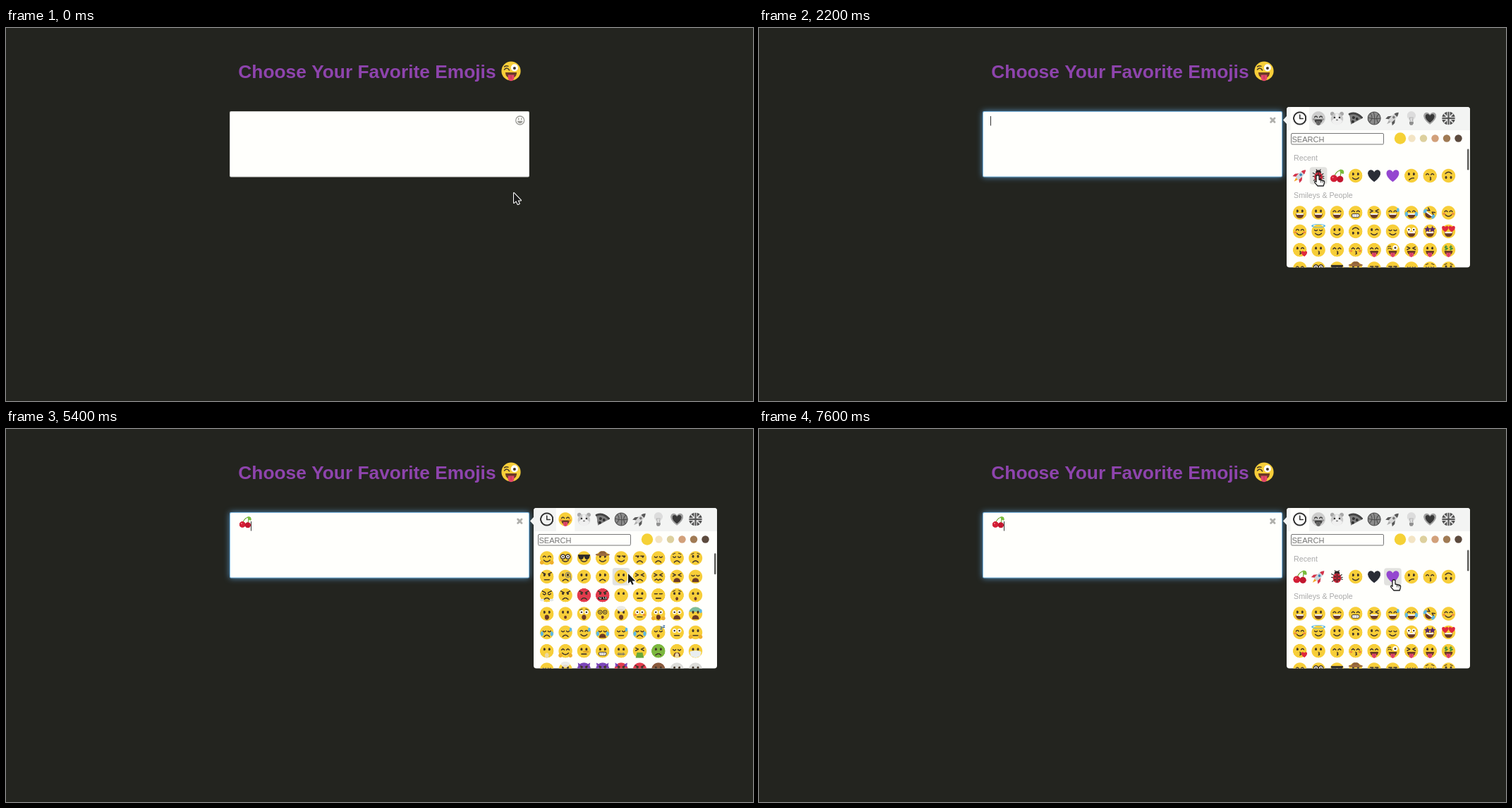
Write an HTML page with a canvas that moves like this. It is 1059 px wide and 529 px high and loops after 8 s.

```html
<!DOCTYPE html>
<html lang="en">
<head>
<meta charset="utf-8">
<title>Emoji picker</title>
<style>
html, body { margin: 0; width: 100%; height: 100%; overflow: hidden; background: #23241f; }
canvas { display: block; }
</style>
</head>
<body>
<canvas width="1059" height="529"></canvas>
<script>
let ctx = document.querySelector('canvas').getContext('2d');
const FONT = '"Liberation Sans", Arial, sans-serif';
const BG = '#23241f', PAPER = '#fffffc', INK = '#43362a', MOUTH = '#6b3a26', RED = '#e0283c', BLUE = '#5cb8e4';
const TINT = { R: '#e23b4d', G: '#7cb83e', P: '#7b45b8', U: '#8a5a3c', L: '#dcdcd8' };
const HEART = 'M0 9C-14-1-9-9-4.5-8.5Q-1-8 0-5Q1-8 4.5-8.5C9-9 14-1 0 9z';
const PITCH = 26.35, HALF = 12.35, SPRITE = 30;

// Drawing helpers
function disc(x, y, rx, color, ry = rx) {
  ctx.beginPath();
  ctx.ellipse(x, y, rx, ry, 0, 0, 7);
  ctx.fillStyle = color;
  ctx.fill();
}
function fill(path, color) {
  ctx.fillStyle = color;
  ctx.fill(new Path2D(path));
}
function line(path, color = INK, width = 1.5) {
  ctx.strokeStyle = color;
  ctx.lineWidth = width;
  ctx.lineCap = ctx.lineJoin = 'round';
  ctx.stroke(new Path2D(path));
}
function box(x, y, w, h, r, color, border) {
  ctx.beginPath();
  ctx.roundRect(x, y, w, h, r);
  ctx.fillStyle = color;
  ctx.fill();
  if (border) { ctx.strokeStyle = border; ctx.lineWidth = 1; ctx.stroke(); }
}
function text(str, x, y, size, color, weight = '') {
  ctx.font = `${weight} ${size}px ${FONT}`;
  ctx.fillStyle = color;
  ctx.fillText(str, x, y);
}
function at(x, y, scale, draw) {
  ctx.save();
  ctx.translate(x, y);
  ctx.scale(scale, scale);
  draw();
  ctx.restore();
}
const ring = (x, y, r) => `M${x - r} ${y}a${r} ${r} 0 1 0 ${2 * r} 0a${r} ${r} 0 1 0 ${-2 * r} 0`;
const both = draw => [-3.6, 3.6].forEach(x => draw(x));

// A face code is one eye letter, one mouth letter, then any extras
const eyes = {
  o: () => both(x => disc(x, -2.5, 1.5, INK, 2)),
  '^': () => both(x => line(`M${x - 2}-1.5q2-3 4 0`)),
  u: () => both(x => line(`M${x - 2}-2q2 2.4 4 0`)),
  '-': () => both(x => line(`M${x - 2}-2h4`)),
  _: () => both(x => { line(`M${x - 2.2}-3h4.4`); disc(x + .8, -1.8, 1.3, INK); }),
  x: () => line('M-6-4.5l4 2-4 2M6-4.5l-4 2 4 2'),
  w: () => { disc(-3.6, -2.5, 1.5, INK, 2); line('M2-2q2-2.5 4 0'); },
  W: () => both(x => { disc(x, -2.5, 3, '#fff'); disc(x, -2.5, 1.3, INK); }),
  Z: () => {
    line('M-7-1.5q3-3 5.2 .6M-7-4.5q2-1.5 4-.5', INK, 1.1);
    disc(3.6, -3.4, 3.7, '#fff');
    disc(3.6, -3, 1.5, INK);
  },
  '*': () => both(x => fill(`M${x}-8l1.4 3.2 3.4.3-2.5 2.3.7 3.4-3-1.8-3 1.8.7-3.4-2.5-2.3 3.4-.3z`, '#5b2a6b')),
  h: () => both(x => at(x * 1.35, -3.5, .52, () => fill(HEART, RED))),
  $: () => both(x => line(`M${x + 1.6}-4.5q-3-1.5-3.2.5t3 1.8t-3 2.2M${x}-6.2v6.6`, '#3d8b3a', 1.2)),
  G: () => both(x => { disc(x, -2, 3.3, '#fff'); line(ring(x, -2, 3.3)); disc(x, -2, 1.2, INK); }),
  S: () => fill('M-9-5h18l-1 4q-1 3-4 3t-3.5-4h-1q0 4-3.5 4t-4-3z', '#2c2a2a'),
  M: () => { eyes.o(); line(ring(3.6, -2.5, 3.6) + 'M7-1l1.5 6', '#777', 1); },
  '@': () => both(x => { line(ring(x, -2.5, 2.8), INK, 1); disc(x, -2.5, 1, INK); })
};
const mouths = {
  '.': () => {},
  D: () => { fill('M-6 1h12q-.5 7-6 7t-6-7z', MOUTH); fill('M-5.5 1h11l-.6 2h-9.8z', '#fff'); },
  g: () => { box(-5.5, 1.5, 11, 5, 2.2, '#fff', INK); line('M-5 4h10M-2 2v4M2 2v4', '#999', .5); },
  ')': () => line('M-4.5 3q4.5 4.5 9 0'),
  '(': () => line('M-4 6.2q4-4.4 8 0'),
  '-': () => line('M-3.5 4.5h7'),
  '/': () => line('M-3 6q3-3 6.5-2.5'),
  o: () => disc(0, 5, 1.9, MOUTH, 2.3),
  O: () => disc(0, 5, 3.2, MOUTH, 3.7),
  k: () => line('M0 2q3 1 .2 2.2q3 1-.2 2.2', INK, 1.2),
  t: () => {
    fill('M-6 1.5h12q-.5 6-6 6t-6-6z', MOUTH);
    fill('M-3.2 4h6.4v3.4q-.4 3-3.2 3t-3.2-3z', '#e2476a');
    line('M0 5v3', '#b92f52', .7);
  },
  T: () => fill('M-5 8q0-6 5-6t5 6z', MOUTH),
  w: () => line('M-5 5l2.5-1.5 2.5 2 2.5-2 2.5 1.5'),
  '#': () => { box(-6.5, 2, 13, 4.5, 1.5, '#2c2424'); line('M-5 3l1.5 2.4M-2 3v2.4M1 3l1.5 2.4M5 3v2.4', '#fff', .8); },
  z: () => line('M-5.5 4.5h11M-4 3v3M-1.5 3v3M1 3v3M3.5 3v3', '#6d6d6d', 1),
  V: () => fill('M-4 2h8l2 8h-12z', '#69a83a'),
  K: () => fill('M-8.5 1q8.5-3 17 0l-1.5 6q-7 5-14 0z', '#e9eef0')
};
const extras = {
  b: () => both(x => disc(x * 1.8, 1.5, 2, '#f0883e', 1.4)),
  d: () => disc(7.6, -4, 1.9, BLUE, 3),
  t: () => both(x => disc(x * 2, 2, 2.2, BLUE, 3.4)),
  h: () => at(0, -8, 1, () => { ctx.scale(1, .27); line(ring(0, 0, 9), BLUE, 2.6); }),
  H: () => at(6.5, 5.5, .45, () => fill(HEART, RED)),
  n: () => both(x => disc(x * 2, 6.5, 3, '#efb02c')),
  a: () => line('M-6-5.5l3.5-1.6M6-5.5l-3.5-1.6', INK, 1),
  v: () => line('M-6.5-6l4.5 2.2M6.5-6l-4.5 2.2'),
  c: () => { fill('M-6-5q1-6 6-5q5-1 6 5z', '#8e6038'); disc(0, -5, 10.5, '#9c6c40', 2); },
  s: () => both(x => disc(x * 1.9, 7, 3, '#e3e8ea', 2)),
  e: () => { disc(0, -8, 6.5, '#ecebe6', 3.6); disc(0, -5, 4, '#e7dcc8', 2); },
  B: () => fill('M-9.5-3a10 10 0 0 1 19 0z', '#7dbd9c'),
  Z: () => line('M3-8h3l-3 3.4h3M7-10h2.4l-2.4 2.8h2.4', '#3a6ea8', 1),
  N: () => line('M0 1h6', '#e0a52a', 2.6),
  p: () => disc(0, 6.5, 3, '#ecd9a4', 3.8),
  j: () => fill('M-9-10l1 7 4-4zM9-10l-1 7-4-4z', TINT.P)
};
function face(code) {
  const [eye, mouth, ...more] = code;
  if (more.includes('f')) ctx.rotate(Math.PI);
  if (more.includes('l')) ctx.rotate(.6);
  const tint = more.find(c => TINT[c]);
  disc(0, 0, 10, tint ? TINT[tint] : '#f7ce39');
  if (more.includes('B')) extras.B();
  eyes[eye]();
  mouths[mouth]();
  more.forEach(c => c !== 'B' && extras[c] && extras[c]());
}

const icons = {
  cherry() {
    line('M-4 2Q-2-6 5-8Q6-2 4.5 1', '#6da52f', 1.2);
    fill('M4-9q7-1 6 6q-6 1-6-6z', '#79bd3c');
    disc(-4.5, 4, 5.2, '#d31f36');
    disc(4.5, 5, 4.8, '#c2172f');
    disc(-6, 2.5, 1.2, '#ee6c79');
  },
  rocket() {
    ctx.rotate(Math.PI / 4);
    fill('M-2 6h4l-2 6z', '#f5a623');
    fill('M-3-2l-4 5v5l4-3zM3-2l4 5v5l-4-3z', '#d4334a');
    fill('M0-12q5 6 3 18h-6q-2-12 3-18z', '#cfd6dc');
    fill('M0-12q2.6 3 3 6h-6q.4-3 3-6z', '#d4334a');
    disc(0, -2, 1.8, '#3b82b5');
  },
  beetle() {
    line('M-8-4l16 8M-8 1h16M-7 7l14-10M-3-9l2 4M3-9l-2 4', '#2b2424', 1.2);
    disc(0, -5, 4, '#2b2424', 3.4);
    disc(0, 2, 6, '#c6283a', 7);
    line('M0-4v12', '#2b2424', 1);
    both(x => { disc(x * .8, 0, 1.2, '#2b2424'); disc(x * .8, 4.5, 1.2, '#2b2424'); });
  },
  black() { fill(HEART, '#2a2d36'); },
  purple() { fill(HEART, '#9446d0'); },
  clock() { line(ring(0, 0, 8.8), '#333', 2.1); line('M0-5v5.5h4.5', '#333', 1.6); },
  hamster() {
    both(x => disc(x * 1.9, -6.5, 3, '#a8a8a8'));
    disc(0, 1, 9, '#c9c9c9', 8.5);
    fill('M-2-7h4l1 6 5 5q-3 6-8 6t-8-6l5-5z', '#f0f0f0');
    both(x => disc(x, -1, 1.3, '#333'));
    disc(0, 2.5, 1.5, '#777', 1);
  },
  pizza() {
    fill('M-9-6q8-5 17 2l2 4-17 9z', '#7d7d7d');
    line('M-9-6q9-4 18 5', '#444', 3);
    [[-3, -1], [2, 1], [-4, 5]].forEach(p => disc(...p, 2, '#333'));
  },
  ball() {
    disc(0, 0, 9.6, '#8b8b8b');
    line(ring(0, 0, 9.2) + 'M-9-1q9 3 18 1M-1-9q3 9 1 18M-6-7q6 6-1 13M7-6q-6 4-1 13', '#4a4a4a', 1);
  },
  bulb() {
    fill('M-3 5q0-3-2-5a6.3 6.3 0 1 1 10 0q-2 2-2 5z', '#dcdcdc');
    line('M-1.5 4l-1-5h5l-1 5', '#aaa', .8);
    fill('M-3 5h6v3l-1.5 2h-3l-1.5-2z', '#909090');
  },
  love() { fill(HEART, '#a0a0a0'); at(0, 0, .72, () => fill(HEART, '#383838')); },
  flag() {
    disc(0, 0, 9.6, '#4a4a4a');
    line('M-6-6l12 12M6-6l-12 12', '#ddd', 2);
    line('M-8.5 0h17M0-8.5v17', '#eee', 4.4);
    line('M-8.5 0h17M0-8.5v17', '#555', 2.2);
  }
};

// Each emoji is drawn once at double size and kept
const sprites = {};
function sprite(code, gray) {
  const key = code + (gray ? ' gray' : '');
  if (sprites[key]) return sprites[key];
  const source = gray && sprite(code);
  const canvas = sprites[key] = document.createElement('canvas');
  canvas.width = canvas.height = 2 * SPRITE;
  const page = ctx;
  ctx = canvas.getContext('2d');
  if (gray) {
    ctx.filter = 'grayscale(1)';
    ctx.drawImage(source, 0, 0);
  } else {
    at(SPRITE, SPRITE, 1.94, icons[code] || (() => face(code)));
  }
  ctx = page;
  return canvas;
}
function emoji(code, x, y, scale = 1, gray = false) {
  const size = SPRITE * scale;
  ctx.drawImage(sprite(code, gray), x - size / 2, y - size / 2, size, size);
}

const tabs = 'clock ^tb hamster pizza ball rocket bulb love flag'.split(' ');
const tones = ['#f5d136', '#f3e4c4', '#ddd09e', '#d2a07a', '#a07a53', '#5c4a3d'];
const recentOld = 'rocket beetle cherry o) black purple o/ ^k o)f'.split(' ');
const recentNew = ['cherry', ...recentOld.filter(c => c !== 'cherry')];
const smileys = [
  'oD oD ^D ^g xD ^Dd ^Dt xDtl ^)b',
  '^)b u)h o) o)f w) u) WD *D hD',
  'wkH ok ^k ^kb ^t Zt xt ot $t',
  '^)n G) S) o)c _) _( u( u(a o(a',
  'o-v M( o/ o( o( x( xw xT uT',
  'u(vs o(v o(vR o#vR o. o- -- ooa oo',
  'oO oo WOa @o oOe W-b WOn WT oTBd',
  'u(t u(d ^)d uTt u-d u(t uoZ W- o-n',
  'o.p ^)n o-N og oz xV o(G uTp oK',
  'u- o-e o)vPj o(vPj o(vRj o(vR o)U oOL oOL'
].map(row => row.split(' '));

// Pointer: time, x, y, kind (0 arrow, 1 arrow over a cell, 2 hand, 3 text)
const pointerKeys = [
  [0, 720, 234, 0], [100, 720, 234, 0], [400, 728, 162, 3], [500, 728, 162, 3],
  [900, 729, 140, 2], [1000, 729, 133, 2], [1400, 729, 133, 2], [1500, 737, 145, 0],
  [2000, 776, 203, 0], [2100, 786, 206, 2], [2200, 792, 209, 2], [2300, 792, 209, 2],
  [2500, 815, 212, 2], [2900, 815, 212, 0], [3400, 828, 270, 0], [3600, 828, 270, 0],
  [4300, 819, 228, 2], [4500, 819, 228, 2], [4900, 857, 205, 2], [5300, 857, 205, 2],
  [5400, 882, 205, 1], [5500, 889, 205, 2], [6200, 945, 205, 2], [6400, 942, 183, 2],
  [7000, 944, 206, 2], [7100, 944, 206, 2], [7600, 900, 214, 2]
];
const scrollKeys = [
  [0, 0], [3200, 0], [3400, 51], [3500, 53], [3600, 53], [4000, 158],
  [6200, 158], [6400, 85.5], [6700, 0]
];
const caretOn = [[1200, 1700], [2200, 3200], [3700, 4200], [5400, 5900], [7000, 8000]];

function track(keys, t) {
  const i = keys.filter(k => k[0] <= t).length - 1;
  const a = keys[i], b = keys[i + 1];
  if (!b) return a;
  const p = (t - a[0]) / (b[0] - a[0]);
  return a.map((v, n) => n === 3 ? v : v + (b[n] - v) * p);
}
const clamp = v => Math.max(0, Math.min(1, v));

function drawInput(t) {
  ctx.save();
  if (t >= 1200) {
    ctx.shadowColor = 'rgba(102,175,233,.75)';
    ctx.shadowBlur = 8;
  }
  box(317, 118, 425, 93.5, 2, t >= 1200 ? '#7fb9e2' : '#d4d4d0');
  ctx.restore();
  box(318, 119, 423, 91.5, 1.5, PAPER);

  const typed = t >= 2800;
  if (typed) emoji('cherry', 339, 132, .88);
  if (caretOn.some(([a, b]) => t >= a && t < b)) {
    ctx.fillStyle = '#333';
    ctx.fillRect(typed ? 347 : 328, typed ? 131 : 125, 1, 13.5);
  }

  const p = clamp((t - 1257) / 300);
  ctx.globalAlpha = 1 - p;
  at(728.7, 131, 1, () => {
    line(ring(0, 0, 6), '#9b9b96', 1.3);
    line('M-2-2.8v1.6M2-2.8v1.6', '#9b9b96', 1.4);
    fill('M-3.8 .8h7.6q-.6 3.4-3.8 3.4t-3.8-3.4z', '#9b9b96');
  });
  ctx.globalAlpha = p;
  line('M725.6 128l5.4 5.4M731 128l-5.4 5.4', '#b0b0ac', 2.8);
  ctx.globalAlpha = 1;
}

function drawPicker(t, [, px, py, kind]) {
  if (t <= 1257) return;
  const scroll = track(scrollKeys, t)[1];
  const opacity = 1 - (1 - clamp((t - 1257) / 250)) ** 2.4;
  const colX = i => 766.7 + i * PITCH;

  ctx.save();
  ctx.translate(13 * (1 - opacity), 0);
  box(748, 112, 260, 227.5, 4, PAPER);
  box(748, 112, 260, 33, [4, 4, 0, 0], '#f3f4f3');
  fill('M748 125l-5 5.5 5 5.5z', '#f3f4f3');

  const active = scroll > 60 ? 1 : 0;
  ctx.fillStyle = PAPER;
  ctx.fillRect(colX(active) - 13.2, 112, 26.4, 33);
  tabs.forEach((name, i) => emoji(name, colX(i), 128, 1, i !== active));

  box(754.5, 149.5, 131, 15.5, 1.5, PAPER, '#777');
  text('SEARCH', 755.5, 161.5, 11, '#757575');
  tones.forEach((color, i) => disc(909 + i * 16.5, 156.5, i ? 5.2 : 8.2, color));

  ctx.save();
  ctx.beginPath();
  ctx.roundRect(748, 169.5, 260, 170, [0, 0, 4, 4]);
  ctx.clip();
  const cell = (code, i, y) => {
    const x = colX(i);
    if (y < 155 || y > 354) return;
    if (kind && Math.abs(px - x) < HALF && Math.abs(py - y) < HALF)
      box(x - HALF, y - HALF, 2 * HALF, 2 * HALF, 4, '#e2e2df');
    emoji(code, x, y);
  };
  text('Recent', 758, 188 - scroll, 10.7, '#a9a9a9');
  (t < 2800 ? recentOld : recentNew).forEach((code, i) => cell(code, i, 209.5 - scroll));
  text('Smileys & People', 758, 241 - scroll, 10.7, '#a9a9a9');
  smileys.forEach((row, r) => row.forEach((code, i) => {
    // rows further down load late, apart from images already in use
    if (t >= 3700 || r < 4 || code === 'o/') cell(code, i, 262 + r * PITCH - scroll);
  }));
  ctx.restore();
  box(1004, 171.5 + scroll * .03, 2.5, 30, 1.2, '#5f5f5c');

  if (opacity < 1) {
    ctx.globalAlpha = 1 - opacity;
    box(748, 112, 260, 227.5, 4, BG);
    fill('M748 125l-5 5.5 5 5.5z', BG);
  }
  ctx.restore();
}

function drawPointer([, x, y, kind]) {
  at(x, y, 1, () => {
    if (kind === 3) {
      line('M-3-8h6M-3 8h6M0-8v16', '#222', 1.1);
    } else if (kind === 2) {
      const hand = 'M-2 1Q0-1.5 2 1V6L8 7.5Q10 8 9.5 10.5L8.2 15H0L-4 10.4Q-5 8.2-3 8.2L-2 9.4z';
      fill(hand, '#fff');
      line(hand, '#222', 1.3);
      line('M4.5 7v3M7 7.6v2.6', '#222', .8);
    } else {
      const arrow = 'M0 0V14L3.3 11.2 5.6 16 7.8 15 5.6 10.4H10z';
      line(arrow, '#fff', 2);
      fill(arrow, '#1b1b1b');
    }
  });
}

function render(t) {
  const pointer = track(pointerKeys, t);
  ctx.fillStyle = BG;
  ctx.fillRect(0, 0, 1059, 529);
  text('Choose Your Favorite Emojis', 329.3, 71, 26.33, '#8e44ad', 'bold');
  at(716, 61, 1.36, () => face('Zt'));
  drawInput(t);
  drawPicker(t, pointer);
  drawPointer(pointer);
}

// The picture advances in tenths of a second
const start = performance.now();
let shown = -1;
function loop() {
  const t = Math.floor(Math.max(0, performance.now() - start) % 8000 / 100) * 100;
  if (t !== shown) render(shown = t);
  requestAnimationFrame(loop);
}
loop();
</script>
</body>
</html>
```
